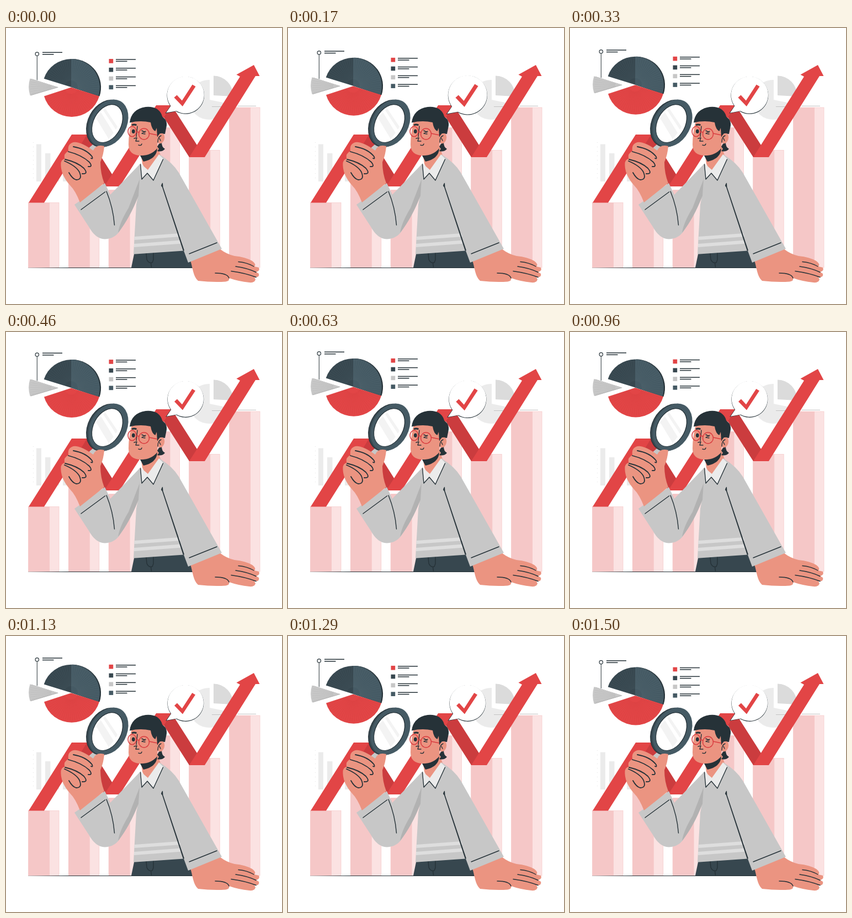
Recreate the animation shown at these times as an HTML page. Size 500 by 500 pixels, loop 1.54 s.

```html
<!DOCTYPE html>
<html lang="en">
<head>
<meta charset="utf-8">
<style>
  html, body { margin: 0; width: 100%; height: 100%; overflow: hidden; background: #fff; }
  svg { display: block; width: 100vw; height: 100vh; }
  .ink { fill: none; stroke: #263238; stroke-width: 1.4; stroke-linecap: round; stroke-linejoin: round; }
  .dark { fill: #263238; }
  .slate { fill: #37474f; }
  .steel { fill: #455a64; }
  .red { fill: #e24546; }
  .fold { fill: #cb3c3e; }
  .grey { fill: #c7c7c7; }
  .pale { fill: #ebebeb; }
  .skin { fill: #eb9481; }
</style>
</head>
<body>
<svg viewBox="0 0 500 500">
  <g id="backdrop">
    <path class="pale" d="M369 94A36 36 0 1 0 403 137L369 130Z"/>
    <path fill="#dbdbdb" d="M376 86.500A36 36 0 0 1 411.500 124L376 122Z"/>
    <path class="pale" d="M55 210.500h9V278h-9ZM71 227h9.500v51H71ZM87 245h9v33h-9ZM103 232h9v46h-9Z"/>
    <path stroke="#e3e3e3" stroke-dasharray="1 7" d="M49.500 207V278" fill="none"/>
  </g>
  <g id="bars"></g>
  <path d="M373 142.500H404M420 141.300H453" stroke="#c4c4c4"/>

  <path class="fold" d="M119 193h28l59 94h-28ZM272 140h28l60 94h-28Z"/>
  <path class="red" d="M41 316.500 119 193h28L69 316.500ZM178 287l94-147h28L206 287ZM332 234 424 88l-6.500-3.500L449 67l10.500 20H452L360 234Z"/>
  <linearGradient id="fade" gradientUnits="userSpaceOnUse" x1="40" x2="110" y1="0" y2="0">
    <stop stop-color="#263238" stop-opacity=".25"/><stop offset="1" stop-color="#263238"/>
  </linearGradient>
  <path d="M40 434h300v.9H40Z" fill="url(#fade)"/>

  <g id="report">
    <path class="dark" d="M120 56A52 51.500 0 0 1 169.500 123.500H167L118 107Z"/>
    <path class="slate" d="M118 107V56A52 51.500 0 0 0 68.700 91.600Z"/>
    <path class="steel" d="M118 107V56A52 51.500 0 0 1 167.500 123.300Z"/>
    <path class="red" d="M118 107.500 169 123.500A52 51.500 0 0 1 69 123.500Z"/>
    <path fill="#a6a6a6" d="M95 107.500 46 92 44.500 122.500Z"/>
    <path class="grey" d="M94 107 43.500 91.500A52 52 0 0 0 43.500 122Z"/>
    <g id="hatch" fill="none" stroke-width=".5"></g>
    <path class="ink" style="stroke-width:1" d="M56.300 50.200V94"/>
    <circle class="ink" cx="56.300" cy="47" r="3.200" style="stroke-width:1.200"/>
    <path class="dark" d="M66 43.500h36V45H66ZM66 47h20.500v1.500H66Z"/>
    <g id="legend"></g>
  </g>

  <g id="bubble">
    <path class="dark" d="M298.400 140.900A32.900 32.900 0 1 1 308.400 150.200L289.300 153.800Z"/>
    <path fill="#fff" d="M299.200 140.700A32.600 32.600 0 1 1 309.100 149.500L291 152.800Z"/>
    <path class="red" d="M305 126l5-4.500 9 9.800 18.300-28.300 5.700 3.500L320 141.500Z"/>
  </g>

  <g id="person">
    <path class="slate" d="M233 405 227 434H337.500L333 400Z"/>
    <path class="ink" d="M254 408l1 11q3 8 10 6l2-5 0-15M262.500 426l1 7"/>

    <path class="skin" d="M334 421C339 437 339 450 348 458Q374 461 398 459.500 406 458 404 453 421 459 441 461 451 462 452 455L450 452Q460 452 458 445L453 442Q461 440 458 434L450 432Q454 428 446 422 434 415 414 413 400 410 387 400Z"/>
    <path class="ink" d="M421 423.500Q437 425 449 432M416 432Q438 435 453 442.500M408 440.500Q434 444 453 451.500M379 444Q401 444 404 453"/>

    <path class="skin" d="M244 225 247 246 256 264 280 231 272 205Z"/>
    <path class="dark" d="M243 231Q262 232 274 218 273 237 249 242Z"/>

    <path class="grey" d="M244 245 256 263 278 229Q302 244 313 262L391 400 330 425 322 403.500 231 409.700 236 320 240 300Q225 340 209 363 199 382 179 382.500 162 382 150 360L124 320 179 281 189 302Z"/>
    <path fill="#b2b2b2" d="M242 274 240 304Q224 345 203 371 206 352 222 326Z"/>
    <path fill="#dedede" d="M232.500 378 314 372l2 6-83.500 6ZM232 391 317 384.500l2 6-87 6.500Z"/>
    <path class="pale" d="M243 245 246 274 256 263 267 276 285 237 277 229 257 257Z"/>
    <path class="ink" d="M243.500 247 246 274 256 263 267 276 284.500 238"/>
    <path class="dark" d="M281 286Q282 281 284 280.500L284.500 288 323 403 321 404 283 288.500Z"/>
    <path class="ink" d="M332 409 382 389M136 329 179.500 297M182 296Q194 325 196.500 357"/>

    <path class="grey" d="M163 206 169 211 155 227 147 220Z"/>
    <g transform="translate(181.500 173) rotate(28)"><ellipse class="dark" rx="33.500" ry="45.500"/><ellipse class="slate" cx="1" rx="33.500" ry="44.500"/></g>
    <g transform="translate(185.500 172.500) rotate(28)">
      <ellipse class="steel" rx="33" ry="45.500"/>
      <ellipse class="dark" cx="-1.500" cy="1.200" rx="25.800" ry="37"/>
      <ellipse fill="#fff" cx="-1.500" cy="1.500" rx="24.500" ry="36"/>
    </g>
    <path fill="#f3f3f3" d="M163 163 172 153 195 190 186 201ZM176 149l4-3 22 33-3 5Z"/>

    <path class="skin" d="M134 316Q126 295 116 285 98 265 99.500 244 101 238 106 237 104 227 113 223 111 210 122 207 134 205 158 222 163 210 178 214 177 229 171 243 171 263 178 281Z"/>
    <path class="ink" style="stroke-width:1.800" d="M122 215Q145 219 156 233 158 238 154 236M113 224Q137 230 151 243 158 252 149 251M107 238Q129 243 141 254 150 265 138 264M106 241Q127 250 133 261 139 275 127 275 120 273 114 262"/>

    <path class="skin" d="M228 168Q222 189 222 211 222 231 245 231 265 229 274 211L285 170Z"/>
    <path class="dark" d="M224 171.500Q227 147 253 143 275 141 282 157 283 162 286 163 292 168 291 177L288 192 279 191 274 198 273 181 270.500 187Q264 184 262 171 243 167 224 171.500ZM282 207 277 210 274 215 277 219 274 223Q283 225 288 219 282 216 282 207Z"/>
    <ellipse class="skin" cx="280.500" cy="200" rx="6.500" ry="9.500" transform="rotate(16 280.500 200)"/>
    <path class="ink" d="M275 207Q275 197 281 195M278 200l2 4"/>
    <path d="M228 176Q232 174 236.500 176" stroke="#263238" stroke-width="3" fill="none"/>
    <ellipse class="dark" cx="230.800" cy="187.300" rx="2.900" ry="3.800"/>
    <path class="ink" d="M238 178 236 197M232 200 237 199 235 205 241 205M246 186l6 3M253 187l-7 4 6 1M240 212Q245 214 246 210"/>
    <g fill="none" stroke="#d93d40" stroke-width="1.500">
      <ellipse cx="228.500" cy="187.500" rx="7.500" ry="9.300"/>
      <ellipse cx="250" cy="192" rx="9.500" ry="10"/>
      <path d="M236 189Q239 187 241 190M259.500 191 274 194"/>
    </g>
  </g>
</svg>
<script>
const PERIOD = 1540, LEAD = 40;
const byId = id => document.getElementById(id);
const rect = (x, y, w, h, fill, extra = '') =>
  `<rect x="${x}" y="${y}" width="${w}" height="${h}" fill="${fill}" ${extra}/>`;

byId('bars').innerHTML = [316.5, 225, 293.5, 180.5, 221.5, 144].map((top, i) => {
  const x = 40.5 + 72.8 * i, height = 434 - top;
  return rect(x, top, 55.5, height, '#fbe2e2', 'stroke="#f5c8c8" stroke-width=".7"') +
    rect(x, top, 38.5, height, '#f5c7c7');
}).join('');

byId('legend').innerHTML = ['#e24546', '#37474f', '#c7c7c7', '#455a64'].map((color, i) => {
  const y = 56 + 15.8 * i;
  return rect(186.5, y, 7.7, 7.7, color) +
    rect(199, y + .2, 36, 1.5, '#263238') + rect(199, y + 3.5, 20.5, 1.5, '#263238');
}).join('');

// Fine radial strokes across one slice, angles in degrees
function hatch(cx, cy, from, to, color) {
  let d = '';
  for (let a = from; a < to; a += 5) {
    const c = Math.cos(a * Math.PI / 180), s = Math.sin(a * Math.PI / 180);
    d += `M${cx + 12 * c} ${cy + 12 * s}L${cx + 50 * c} ${cy + 50 * s}`;
  }
  return `<path d="${d}" stroke="${color}" opacity=".5"/>`;
}
byId('hatch').innerHTML =
  hatch(118, 107, 201, 268, '#52646d') + hatch(118, 107, -87, 16, '#60737c') +
  hatch(118, 107.5, 22, 160, '#cb3c3e') + hatch(94, 107, 166, 196, '#a6a6a6');

const ramp = (p, a, b) => Math.min(1, Math.max(0, (p - a) / (b - a)));
const beat = p => 1 + .1 * (ramp(p, 0, .1) - ramp(p, .1, .3) + ramp(p, .4, .5) - ramp(p, .5, .6));
const float = p => -10 * (1 - Math.abs(1 - 2 * p));

function draw(now) {
  const p = (now + LEAD) % PERIOD / PERIOD;
  byId('report').setAttribute('transform', `translate(0 ${float(p) + .6})`);
  byId('bubble').setAttribute('transform', `translate(324.5 122) scale(${beat(p)}) translate(-324.5 -122)`);
}

const start = performance.now();
function tick() {
  draw(performance.now() - start);
  requestAnimationFrame(tick);
}
tick();
</script>
</body>
</html>
```
